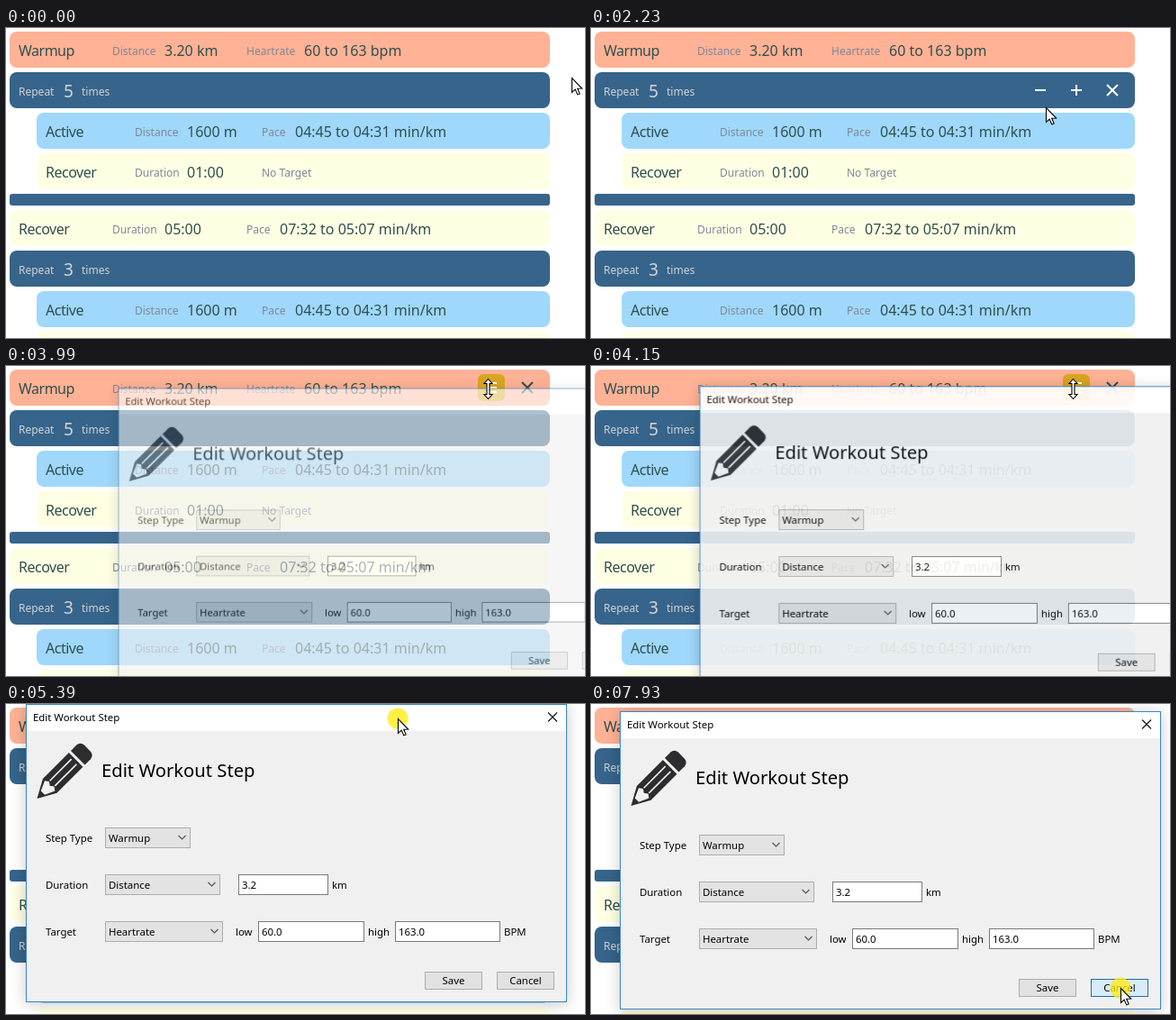
Write an HTML page with a canvas that moves like this. It is 643 px wide and 344 px high and loops after 8000 ms.

```html
<!DOCTYPE html>
<html lang="en">
<head>
<meta charset="utf-8">
<title>Workout editor</title>
<style>
html, body { margin: 0; width: 100%; height: 100%; overflow: hidden; background: #fff; }
canvas { display: block; }
</style>
</head>
<body>
<canvas id="stage" width="643" height="344"></canvas>
<script>
const LOOP = 8000, STEP = 77;
const SANS = '"Noto Sans", "Open Sans", sans-serif';
const SLATE = '#2f4f4f', CREAM = '#fffff0';
const stage = document.getElementById('stage');
const ctx = stage.getContext('2d');

function text(c, str, x, y, size, color, spacing = 0) {
  c.font = `${size}px ${SANS}`;
  c.letterSpacing = `${spacing}px`;
  c.fillStyle = color;
  c.fillText(str, x, y);
}

function fillRound(c, x, y, w, h, r, color) {
  c.fillStyle = color;
  c.beginPath();
  c.roundRect(x, y, w, h, r);
  c.fill();
}

function lines(c, color, width, ...paths) {
  c.strokeStyle = color;
  c.lineWidth = width;
  c.beginPath();
  for (const p of paths) {
    c.moveTo(p[0], p[1]);
    for (let i = 2; i < p.length; i += 2) c.lineTo(p[i], p[i + 1]);
  }
  c.stroke();
}

function polygon(c, pts, color) {
  c.beginPath();
  for (let i = 0; i < pts.length; i += 2) c.lineTo(pts[i], pts[i + 1]);
  c.closePath();
  c.fillStyle = color;
  c.fill();
}

function framed(c, x, y, w, h, fill, border) {
  c.fillStyle = border;
  c.fillRect(x, y, w, h);
  c.fillStyle = fill;
  c.fillRect(x + 1, y + 1, w - 2, h - 2);
}

// ---- workout list ----
const COLORS = { Warmup: '#ffb295', Active: '#9fd8fb', Recover: '#ffffe4' };

function step(y, name, nested, label, value, target, range) {
  return { y, name, nested, label, value, target, range, icons: [['edit', 524], ['close', 564]] };
}
function repeat(y, times) {
  return { y, times, icons: [['minus', 484], ['plus', 524], ['close', 564]] };
}

const rows = [
  step(4, 'Warmup', false, 'Distance', '3.20 km', 'Heartrate', '60 to 163 bpm'),
  repeat(49, '5'),
  step(94, 'Active', true, 'Distance', '1600 m', 'Pace', '04:45 to 04:31 min/km'),
  step(139, 'Recover', true, 'Duration', '01:00', 'No Target', ''),
  step(202, 'Recover', false, 'Duration', '05:00', 'Pace', '07:32 to 05:07 min/km'),
  repeat(247, '3'),
  step(292, 'Active', true, 'Distance', '1600 m', 'Pace', '04:45 to 04:31 min/km'),
  step(337, 'Recover', true, 'Duration', '01:00', 'No Target', '')
];

const ICONS = {
  minus: [[-6, 0, 6, 0]],
  plus: [[-6, 0, 6, 0], [0, -6, 0, 6]],
  close: [[-6, -6, 6, 6], [6, -6, -6, 6]],
  edit: [[-6, -5, 6, -5], [-6, 0, 6, 0], [-6, 5, 6, 5]]
};

function drawRow(row) {
  const y = row.y;
  if (row.times) {
    fillRound(ctx, 4, y, 600, 40, 8, '#36648b');
    text(ctx, 'Repeat', 14, y + 26, 12, '#d3d3d3');
    text(ctx, row.times, 64, y + 28, 19, '#d3d3d3');
    text(ctx, 'times', 84, y + 26, 12, '#d3d3d3');
    return;
  }
  const x = row.nested ? 34 : 4;
  const labelX = row.nested ? 143 : 118;
  const targetX = row.nested ? 284 : 267;
  fillRound(ctx, x, y, 604 - x, 40, 8, COLORS[row.name]);
  text(ctx, row.name, x + 10, y + 27, 16, SLATE, -0.5);
  text(ctx, row.label, labelX, y + 26, 12, '#7f8798');
  text(ctx, row.value, labelX + 58, y + 27, 16, SLATE);
  text(ctx, row.target, targetX, y + 26, 12, '#7f8798');
  const gap = row.target === 'Pace' ? 37 : 64;
  text(ctx, row.range, targetX + gap, y + 27, 16, SLATE);
}

function drawIcons(row, px, py) {
  for (const [name, x] of row.icons) {
    const y = row.y + 5;
    const hot = px >= x && px < x + 30 && py >= y && py < y + 30;
    if (hot) fillRound(ctx, x, y, 30, 30, 6, '#daa520');
    ctx.save();
    ctx.translate(x + 15, y + 15);
    lines(ctx, hot || row.times ? CREAM : SLATE, 2, ...ICONS[name]);
    ctx.restore();
  }
}

function drawList(px, py) {
  rows.forEach(drawRow);
  fillRound(ctx, 4, 184, 600, 13, 3, '#36648b');
  const row = rows.find(r => py >= r.y && py < r.y + 40 && px >= (r.nested ? 34 : 4) && px < 604);
  if (row) drawIcons(row, px, py);
}

// ---- dialog, painted once ----
const PAD = 24, DW = 601, DH = 331, FONT = 11.4;

function drawPencil(c) {
  const ink = '#2d2d2f', paper = '#f0f0f0';
  c.save();
  c.translate(12.5, 105);
  c.rotate(-Math.PI / 4);
  polygon(c, [0, 0, 20, -11, 61, -11, 61, 11, 20, 11], ink);
  polygon(c, [9, -3, 20, -8, 23, -4, 20, 0, 23, 4, 20, 8, 9, 3], paper);
  lines(c, paper, 1.6, [24, -4, 58, -4], [24, 4, 58, 4]);
  fillRound(c, 64, -11, 15, 22, [0, 6, 6, 0], ink);
  c.restore();
}

function combo(c, x, y, w, value) {
  framed(c, x, y, w, 23, '#e3e3e3', '#adadad');
  text(c, value, x + 4, y + 16, FONT, '#000');
  const ax = x + w - 9.5, ay = y + 11;
  lines(c, '#555', 1.2, [ax - 4, ay - 2, ax, ay + 2, ax + 4, ay - 2]);
}

function input(c, x, y, w, value) {
  framed(c, x, y, w, 23, '#fff', '#7a7a7a');
  text(c, value, x + 4, y + 16, FONT, '#000');
}

function button(c, x, y, label, fill, border) {
  framed(c, x, y, 64, 20, fill, border);
  c.textAlign = 'center';
  text(c, label, x + 32, y + 14, FONT, '#000');
  c.textAlign = 'left';
}

function makeDialog() {
  const sheet = document.createElement('canvas');
  sheet.width = DW + PAD * 2;
  sheet.height = DH + PAD * 2;
  const c = sheet.getContext('2d');
  c.translate(PAD, PAD);
  c.shadowColor = 'rgba(0,0,0,.22)';
  c.shadowBlur = 16;
  c.shadowOffsetY = 2;
  c.fillStyle = '#fff';
  c.fillRect(0, 0, DW, DH);
  c.shadowColor = 'transparent';
  framed(c, 0, 0, DW, DH, '#f0f0f0', '#3b83c0');
  c.fillStyle = '#fff';
  c.fillRect(1, 1, DW - 2, 29);
  text(c, 'Edit Workout Step', 8, 19, FONT, '#000');
  lines(c, '#111', 1.1, [580, 9.5, 590, 19.5], [590, 9.5, 580, 19.5]);

  drawPencil(c);
  text(c, 'Edit Workout Step', 84, 81, 20.2, '#000');

  const label = (str, x, y) => text(c, str, x, y, FONT, '#000');
  label('Step Type', 22, 153);
  combo(c, 88, 137, 95, 'Warmup');
  label('Duration', 22, 205);
  combo(c, 88, 189, 128, 'Distance');
  input(c, 236, 189, 100, '3.2');
  label('km', 340, 205);
  label('Target', 22, 257);
  combo(c, 88, 241, 131, 'Heartrate');
  label('low', 233, 257);
  input(c, 258, 241, 118, '60.0');
  label('high', 380, 257);
  input(c, 410, 241, 117, '163.0');
  label('BPM', 531, 257);
  button(c, 443, 297, 'Save', '#e1e1e1', '#adadad');
  button(c, 523, 297, 'Cancel', '#e1e1e1', '#adadad');
  return sheet;
}
const dialog = makeDialog();

// ---- pointer ----
const PATH = [
  [0, 628, 55], [3, 612, 44], [6, 578, 30], [9, 540, 24], [10, 540, 24],
  [14, 562, 46], [17, 580, 65], [18, 578, 66], [21, 542, 66], [24, 514, 67],
  [27, 495, 66], [29, 505, 88], [32, 541, 115], [36, 577, 117], [39, 572, 76],
  [41, 557, 46], [43, 536, 31], [45, 535, 25], [59, 535, 25], [61, 533, 38],
  [62, 533, 38], [66, 480, 27], [70, 435, 16], [74, 446, 23], [75, 446, 23],
  [77, 445, 24], [78, 445, 24], [82, 537, 225], [86, 591, 322], [89, 588, 315]
];

function pointerAt(n) {
  const i = PATH.findIndex(k => k[0] >= n);
  if (i < 0) return PATH[PATH.length - 1].slice(1);
  if (i === 0) return PATH[0].slice(1);
  const a = PATH[i - 1], b = PATH[i], f = (n - a[0]) / (b[0] - a[0]);
  return [1, 2].map(k => Math.round(a[k] + (b[k] - a[k]) * f));
}

const ARROW = [0, 0, 0, 16, 3.7, 12.6, 6.2, 18.4, 8.6, 17.4, 6.2, 11.8, 11.2, 11.6];
const RESIZE = [0, -11, 4.5, -6, 1.5, -6, 1.5, 6, 4.5, 6, 0, 11, -4.5, 6, -1.5, 6, -1.5, -6, -4.5, -6];

function drawPointer(x, y, shape) {
  ctx.save();
  ctx.translate(x + 0.5, y + 0.5);
  polygon(ctx, shape, '#fff');
  ctx.strokeStyle = '#000';
  ctx.lineWidth = 1.1;
  ctx.stroke();
  ctx.restore();
}

function drawClick(x, y) {
  ctx.fillStyle = 'rgba(255,236,20,.78)';
  ctx.beginPath();
  ctx.arc(x, y, 11.5, 0, Math.PI * 2);
  ctx.fill();
}

function drawDialog(n, px, py) {
  const left = Math.max(0, 55 - n) / 6;
  const scale = 1 - 0.06 * left * left;
  const [x, y] = n < 62 ? [120, 22] : [px - 413, py - 16];
  ctx.save();
  ctx.globalAlpha = 1 - left ** 1.3;
  ctx.translate(x + DW / 2, y + DH / 2);
  ctx.scale(scale, scale);
  ctx.drawImage(dialog, -DW / 2 - PAD, -DH / 2 - PAD);
  ctx.restore();
}

function render(t) {
  const n = Math.floor((t + 15) / STEP);
  const [px, py] = pointerAt(n);
  ctx.fillStyle = '#fff';
  ctx.fillRect(0, 0, 643, 344);
  drawList(...pointerAt(Math.min(n, 50)));
  if (n >= 50) drawDialog(n, ...pointerAt(Math.min(n, 78)));
  if (n >= 86) {
    const pressed = n >= 103;
    button(ctx, 555, 305, 'Cancel', pressed ? '#d8ebf9' : '#e5f1fb', pressed ? '#1a6fb5' : '#0078d7');
  }
  if (n === 50 || n === 51 || (n >= 62 && n < 79) || n >= 103) drawClick(px, py);
  drawPointer(px, py, n >= 52 && n <= 60 ? RESIZE : ARROW);
}

function frame() {
  render(performance.now() % LOOP);
  requestAnimationFrame(frame);
}
frame();
</script>
</body>
</html>
```
